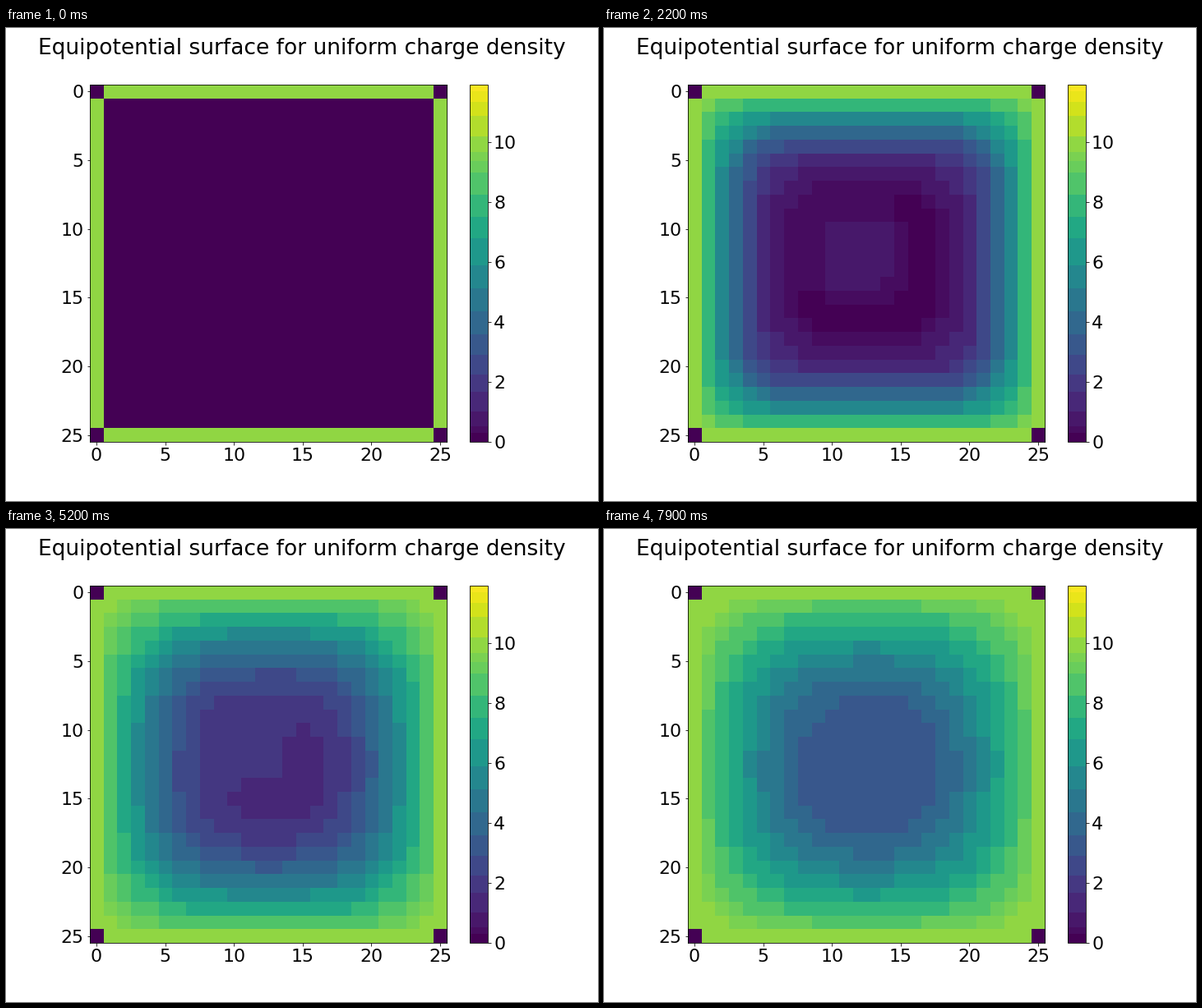
Animation, 720 px wide and 576 px high, one loop 8 s. Source, as a matplotlib script:

```python
import numpy as np
import matplotlib.pyplot as plt
from matplotlib.animation import FuncAnimation
from matplotlib.colors import ListedColormap

WIDTH, HEIGHT, DPI = 720, 576, 72
FRAMES, INTERVAL = 80, 100
CELLS = 26
WALL = 10.0
CHARGE = 1 / 16
VMAX = 11.92
BAND_EDGES = [0, 0.3, 0.51, 1.02, 1.67, 2.24, 2.9, 3.59, 4.36, 5.12, 5.89,
              6.8, 7.5, 8.24, 9.0, 9.37, 9.67, 10.19, 10.87, 11.34, 11.7, VMAX]

plt.rcParams.update({"font.family": "DejaVu Sans", "font.size": 22})


def banded_viridis(size=2048):
    """Viridis reduced to flat bands between the given edges."""
    edges = np.array(BAND_EDGES)
    middles = (edges[:-1] + edges[1:]) / 2
    middles[0] = 0
    values = (np.arange(size) + 0.5) / size * VMAX
    bands = np.digitize(values, edges[1:-1])
    return ListedColormap(plt.get_cmap("viridis")(middles[bands] / VMAX))


def relax(steps):
    """Jacobi relaxation with fixed walls and a square of uniform charge."""
    source = np.zeros((CELLS, CELLS))
    source[10:15, 10:15] = CHARGE
    field = np.zeros((CELLS, CELLS))
    field[[0, -1], 1:-1] = WALL
    field[1:-1, [0, -1]] = WALL
    fields = [field]
    for _ in range(steps - 1):
        previous, field = field, field.copy()
        field[1:-1, 1:-1] = (previous[:-2, 1:-1] + previous[2:, 1:-1]
                             + previous[1:-1, :-2] + previous[1:-1, 2:]) / 4
        field += source
        fields.append(field)
    return fields


def add_axes(left, width):
    return fig.add_axes([left / WIDTH, 0.125, width / WIDTH, 0.755])


fields = relax(FRAMES)

fig = plt.figure(figsize=(WIDTH / DPI, HEIGHT / DPI), dpi=DPI, facecolor="white")
fig.suptitle("Equipotential surface for uniform charge density")

side = 0.755 * HEIGHT
ax = add_axes(536.4 - side, side)
image = ax.imshow(fields[0], cmap=banded_viridis(), vmin=0, vmax=VMAX,
                  interpolation="nearest")
ax.set_xticks(range(0, CELLS, 5))
ax.set_yticks(range(0, CELLS, 5))
fig.colorbar(image, cax=add_axes(564.3, side / 20), ticks=range(0, 11, 2))


def update(frame):
    image.set_data(fields[frame])
    return [image]


animation = FuncAnimation(fig, update, frames=FRAMES, interval=INTERVAL,
                          repeat=True, repeat_delay=0)
plt.show()
```
